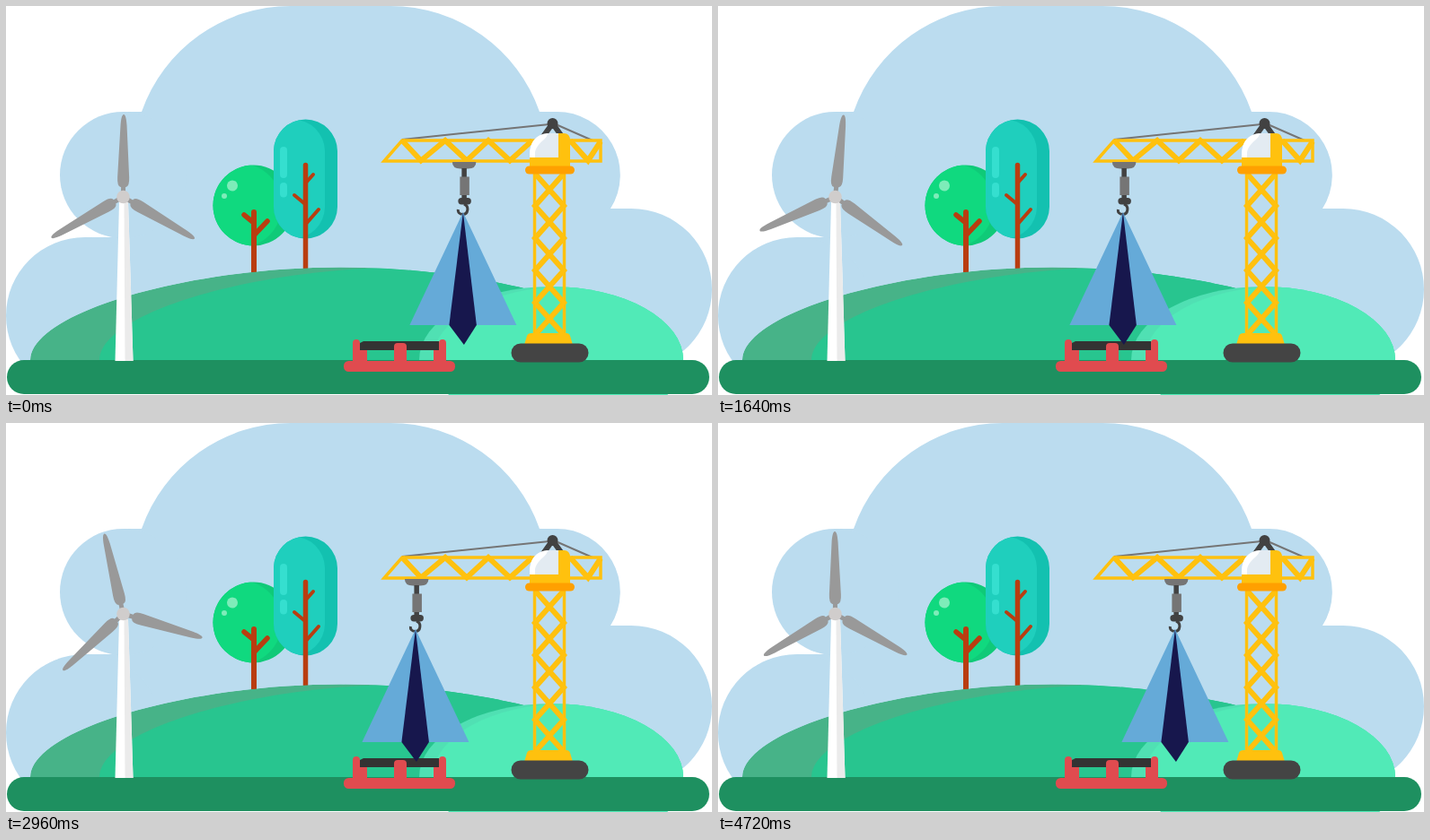
Animation, 786 px wide and 434 px high, one loop 4.76 s. Source, as an HTML page:

```html
<!DOCTYPE html>
<html lang="en">
<head>
<meta charset="utf-8">
<title>Crane and wind turbine</title>
<style>
  html, body { margin: 0; width: 100%; height: 100%; overflow: hidden; background: #fff; }
  svg { display: block; width: 100%; height: 100%; }
</style>
</head>
<body>
<svg viewBox="0 0 786 434">
  <defs>
    <path id="hill" d="M27 395C27 343 199 291.500 372 291.500S717 343 717 395Z"/>
    <clipPath id="hillClip"><use href="#hill"/></clipPath>
    <clipPath id="moundClip"><ellipse cx="607" cy="395" rx="147" ry="82"/></clipPath>
    <clipPath id="roundClip"><circle cx="275.500" cy="222.500" r="45"/></clipPath>
    <clipPath id="tallClip"><rect x="298" y="126.500" width="71" height="133" rx="35.5"/></clipPath>
    <path id="blade" d="M0-92C2-92 3-87 3.500-80L6.500-22Q7-12 3-11H2.500V0H-2.500V-11H-3Q-7-12-6.500-22L-3.500-80C-3-87-2-92 0-92Z"/>
  </defs>

  <g id="cloud" fill="#bbdcef">
    <path d="M151 118A176 176 0 0 1 317 0H428A176 176 0 0 1 594 118H612.500A70.500 70.500 0 0 1 673 226H696A90 90 0 0 1 696 406H87.500V258H131V118Z"/>
    <circle cx="130.500" cy="188.500" r="70.500"/>
    <circle cx="87.500" cy="345.500" r="87.500"/>
  </g>

  <g id="roundTree">
    <g clip-path="url(#roundClip)">
      <rect x="230" y="177" width="92" height="91" fill="#0fca78"/>
      <circle cx="260" cy="222.500" r="47" fill="#10d97f"/>
    </g>
    <g fill="#7eecb9"><circle cx="252" cy="200.500" r="6"/><circle cx="243" cy="212" r="3"/></g>
    <g fill="none" stroke="#b93d10" stroke-linecap="round">
      <path d="M276 230V300" stroke-width="6"/>
      <path d="M265 233L276 242M291 240L276 256" stroke-width="5.500"/>
    </g>
  </g>

  <g id="tallTree">
    <g clip-path="url(#tallClip)">
      <rect x="298" y="126" width="71" height="134" fill="#13c1b0"/>
      <rect x="284" y="126.500" width="71" height="133" rx="35.500" fill="#1fcfbd"/>
    </g>
    <g fill="#35dfcf">
      <rect x="305" y="157" width="8" height="35" rx="4"/>
      <rect x="305" y="197" width="8" height="16.500" rx="4"/>
    </g>
    <g fill="none" stroke="#b93d10" stroke-linecap="round">
      <path d="M333.500 177.500V298" stroke-width="5.500"/>
      <path d="M342 188L334 197M321 211L333 221M348 227L334 243" stroke-width="4"/>
    </g>
  </g>

  <g clip-path="url(#hillClip)">
    <use href="#hill" fill="#47b388"/>
    <use href="#hill" x="77" fill="#28c58f"/>
    <rect x="449" y="290" width="300" height="106" fill="#28c58f"/>
  </g>
  <g clip-path="url(#moundClip)">
    <rect x="459" y="312" width="297" height="84" fill="#50e0b3"/>
    <ellipse cx="625" cy="395" rx="150" ry="82" fill="#51eab7"/>
    <rect x="625" y="312" width="130" height="84" fill="#51eab7"/>
  </g>
  <rect x="1" y="395" width="782" height="38" rx="19" fill="#1e9060"/>

  <g id="turbine">
    <path d="M126 219H136L141.500 396H121.500Z" fill="#fff"/>
    <path d="M131.500 219H136L141.500 396H132.500Z" fill="#ebebeb"/>
    <g id="rotor" fill="#999">
      <use href="#blade"/><use href="#blade" transform="rotate(120)"/><use href="#blade" transform="rotate(240)"/>
    </g>
    <circle cx="130.500" cy="213" r="7.300" fill="#d0cdcc"/>
  </g>

  <g id="crane">
    <path d="M441 149L605 132M612 132L653 150" stroke="#757575" stroke-width="2"/>
    <g fill="none" stroke="#ffc10e">
      <path d="M588.500 186V368M621.500 186V368M421 173L441 150H662V173Z" stroke-width="3.500"/>
      <path id="mastBars" stroke-width="6"/>
      <path d="M441 150L462 172.500L489 150L513 172.500L537 150L561 172.500L586 150M628 150L648 172.500L662 151" stroke-width="6"/>
    </g>
    <path d="M597 147L608.500 131L620 147" fill="none" stroke="#424242" stroke-width="6"/>
    <circle cx="608.500" cy="131" r="6" fill="#424242"/>
    <path d="M583 170V166C583 150 592 142 606 142H616V170Z" fill="#e3ebf2"/>
    <path d="M583 170V166C583 151 591 143 603 142C602 150 592 151 589 163V170Z" fill="#fff"/>
    <path d="M615 142H621Q628 142 628 150V180H583V169H615Z" fill="#ffc10e"/>
    <rect x="578" y="178.500" width="55" height="9" rx="4.500" fill="#ffa000"/>
    <path d="M585 365H624Q627 365 628 368L631 378H577L580 368Q581 365 585 365Z" fill="#ffc10e"/>
    <rect x="562.500" y="376.500" width="86" height="21" rx="10.500" fill="#444"/>
  </g>

  <path d="M398 374H482V384H394V376Z" fill="#333"/>
  <g id="load">
    <path d="M-12 174H14.500Q14.500 181.500 5.500 181.500H-3Q-12 181.500-12 174Z" fill="#757575"/>
    <g fill="#424242">
      <rect x="-1.500" y="181" width="5.500" height="35"/>
      <rect x="-5.500" y="214" width="14.500" height="7.500" rx="3.700"/>
    </g>
    <rect x="-3.500" y="190.500" width="10.500" height="20.500" fill="#757575"/>
    <path d="M1 221C7 223 6 232.500-.5 232.500C-4 232.500-6 230-5.500 227" fill="none" stroke="#424242" stroke-width="3"/>
    <path d="M0 230L59.500 356H-59.500Z" fill="#65aad8"/>
    <path d="M0 230L15 356L1 378L-15.500 356Z" fill="#17174d"/>
  </g>
  <g id="stand" fill="#e04b4f">
    <rect x="376" y="396" width="124" height="12" rx="5.500"/>
    <path d="M386 398V376Q386 372 390 372Q394 372 394 376V384H402V398Z"/>
    <path d="M490 398V376Q490 372 486 372Q482 372 482 376V384H476V398Z"/>
    <path d="M432 398V380Q432 376 436 376H442Q446 376 446 380V398Z"/>
  </g>
</svg>
<script>
  const LOOP = 4760;
  const rotor = document.getElementById('rotor');
  const load = document.getElementById('load');

  // Two mirrored zigzags make the mast lattice.
  const zigzag = first => {
    let d = '';
    for (let i = 0; i < 6; i++) {
      d += (i ? 'L' : 'M') + ((i + first) % 2 ? 621 : 589) + ' ' + (187 + i * 36);
    }
    return d;
  };
  document.getElementById('mastBars').setAttribute('d', zigzag(0) + zigzag(1));

  const ramp = (t, from, to) => Math.min(1, Math.max(0, (t - from) / (to - from)));

  function draw(t) {
    const angle = Math.min(0.3 + t * 0.0765, 359.7);
    const x = 508.9 - 70.7 * (ramp(t, 0, 2000) - ramp(t, 2480, 4400));
    rotor.setAttribute('transform', `translate(130.5 213) rotate(${angle})`);
    load.setAttribute('transform', `translate(${x} 0)`);
  }

  const start = performance.now();
  function tick() {
    draw((performance.now() - start) % LOOP);
    requestAnimationFrame(tick);
  }
  draw(0);
  requestAnimationFrame(tick);
</script>
</body>
</html>
```
